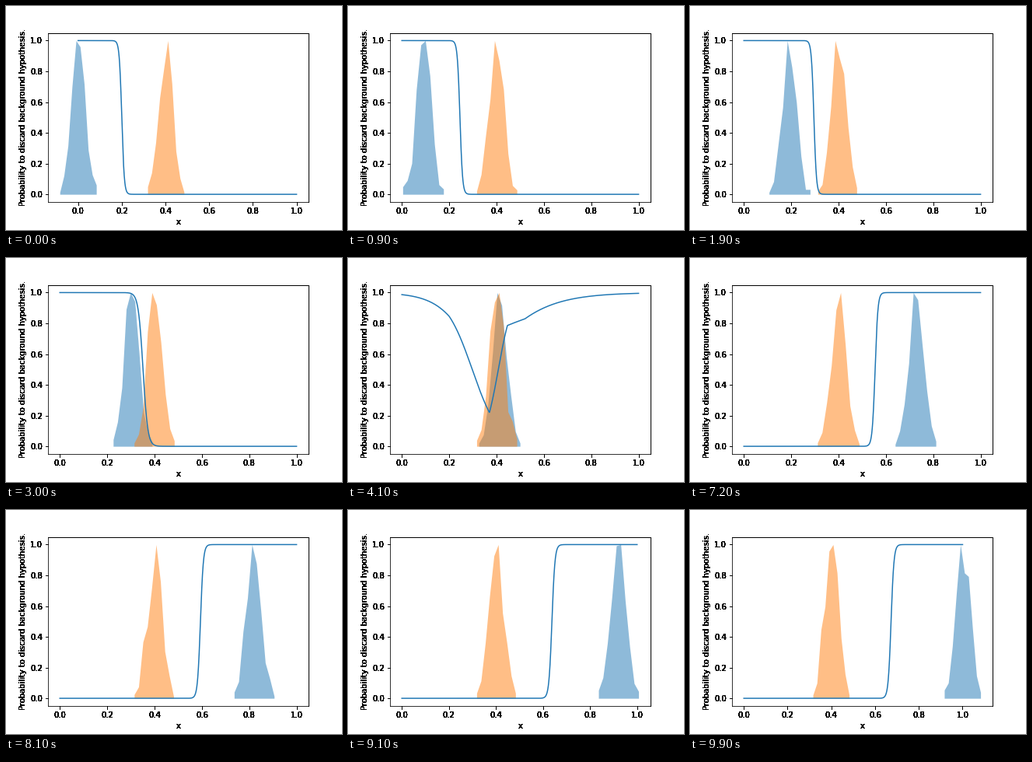
Animation of 432 by 288 pixels, one loop 10000 ms. Source, as a matplotlib script:

```python
import numpy as np
import matplotlib.pyplot as plt
from matplotlib.animation import FuncAnimation

FRAMES, INTERVAL = 100, 100
FIXED, SIGMA = 0.4, 0.031
BINS, HALF_SPAN, PEAK_COUNT = 10, 0.084, 140

plt.rcParams.update({"font.family": "DejaVu Sans", "font.size": 10})
fig = plt.figure(figsize=(6, 4), dpi=72, facecolor="white")
ax = fig.add_axes([0.125, 0.125, 0.775, 0.755])

x = np.linspace(0, 1, 1000)

# Logit of the curve while both samples overlap: linear between a few kinks.
valley = np.interp(x, (0, 0.2, 0.37, 0.446, 0.52, 1), (4.3, 1.7, -1.27, 1.3, 1.58, 5.3))
VALLEY_AT, VALLEY_WIDTH = 41, 5


def embolden(artist, times=12):
    """Draw an artist repeatedly so its soft edges turn solid."""
    draw = artist.draw

    def repeat(renderer):
        for _ in range(times):
            draw(renderer)

    artist.draw = repeat


def histogram(mean, rng):
    """Bin centres and peak-normalised counts of a random normal sample."""
    lo, hi = mean + HALF_SPAN * np.array([-1, 1]) + rng.normal(0, 0.004, 2)
    centers = np.linspace(lo, hi, BINS)
    expected = PEAK_COUNT * np.exp(-0.5 * ((centers - mean) / SIGMA) ** 2)
    counts = 1 + rng.poisson(expected)
    return centers, counts / counts.max()


def classifier(i, mean):
    """A sigmoid step between the samples that melts into the valley."""
    gap = mean - FIXED
    steep = min(abs(gap) / SIGMA**2, 195 - 60 * abs(mean - 0.3))
    if gap < 0:
        center = 0.2 + 0.5 * mean
    else:
        center = 0.412 + 0.435 * gap
    mix = np.exp(-((i - VALLEY_AT) / VALLEY_WIDTH) ** 2)
    logit = (1 - mix) * np.sign(gap) * steep * (x - center) + mix * valley
    return 1 / (1 + np.exp(-logit))


def update(i):
    rng = np.random.default_rng(i)
    mean = i / (FRAMES - 1)
    ax.clear()
    for mu, color in ((mean, "C0"), (FIXED, "C1")):
        centers, heights = histogram(mu, rng)
        ax.fill_between(centers, heights, color=color, alpha=0.5, linewidth=0)
    ax.plot(x, classifier(i, mean), color="C0", lw=1.5)
    ax.set_xlabel("x")
    ax.set_ylabel("Probability to discard background hypothesis.")


for part in (ax.xaxis, ax.yaxis, ax.spines["right"], ax.spines["top"]):
    embolden(part)

anim = FuncAnimation(fig, update, frames=FRAMES, interval=INTERVAL,
                     repeat=True, repeat_delay=0)
plt.show()
```
